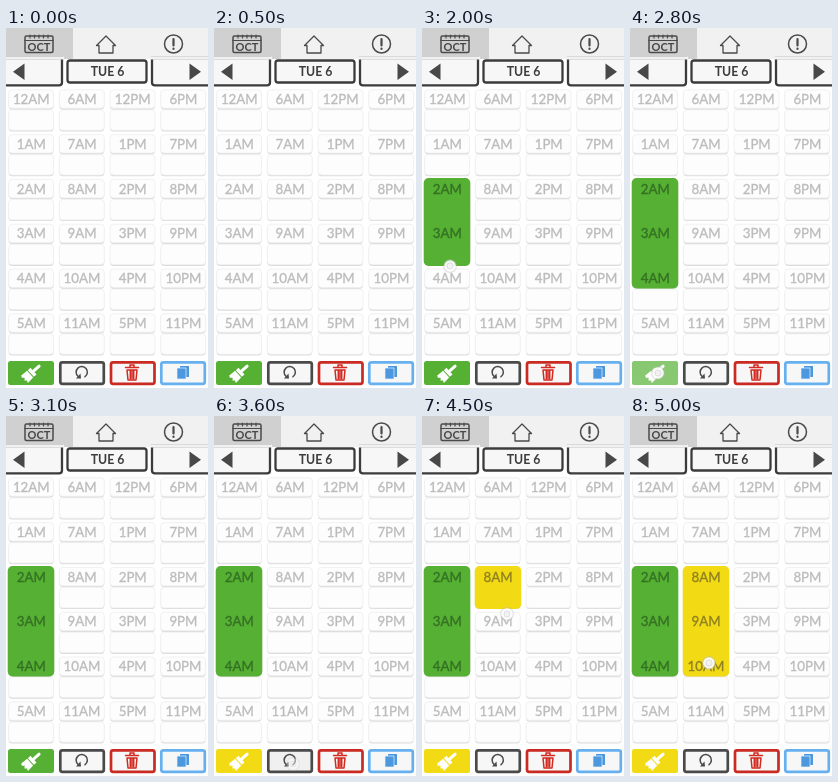
Animation, 202 px wide and 360 px high, one loop 5.1 s. Source, as an HTML page:

```html
<!DOCTYPE html>
<html lang="en">
<head>
<meta charset="utf-8">
<style>
html, body { margin: 0; width: 100%; height: 100%; overflow: hidden; background: #fff; }
svg { display: block; width: 100vw; height: 100vh; }
text { font-family: Lato, "Open Sans", sans-serif; text-anchor: middle; }
.line { fill: none; stroke: #4a4a4a; stroke-width: 1.5; stroke-linejoin: round; stroke-linecap: round; }
.bar { fill: #f7f7f7; stroke: #3c3c3c; stroke-width: 2.3; }
.button { fill: #f7f7f7; stroke-width: 2.7; }
.cell { fill: #fdfdfd; stroke: #eee; stroke-width: .8; }
.shade { fill: #dadada; }
.hour { font-size: 13.3px; stroke-width: .35; }
</style>
</head>
<body>
<svg viewBox="0 0 202 360" preserveAspectRatio="none">
  <rect width="202" height="360" fill="#fff"/>
  <rect width="202" height="31" fill="#f1f1f1"/>
  <rect width="67" height="31" fill="#d0d0d0"/>

  <g class="line">
    <rect x="19" y="8" width="28" height="16.500" rx="1.500"/>
    <path d="M19 12.500H47M24 7V10M28.500 7V10M33 7V10M37.500 7V10M42 7V10" stroke-width="1.200"/>
    <path d="M90.500 17.500L100 8L109.500 17.500H107V25H93V17.500Z" stroke-width="1.300"/>
    <circle cx="167.500" cy="16" r="9"/>
    <path d="M167.500 11V17.500M167.500 20.500V21" stroke-width="2.200"/>
  </g>
  <text x="33" y="23" font-size="11" font-weight="700" fill="#484848">OCT</text>

  <path class="bar" d="M-2 30H56V54.500Q56 57.300 53 57.300H-2Z"/>
  <path class="bar" d="M204 30H146V54.500Q146 57.300 149 57.300H204Z"/>
  <path d="M0 30H58M144 30H202" stroke="#f1f1f1" stroke-width="3"/>
  <rect class="bar" x="61.500" y="32.500" width="79" height="22" rx="2.500"/>
  <path d="M7 43.700L18.500 35.500V52ZM195 43.700L183.500 35.500V52Z" fill="#484848"/>
  <text x="101.500" y="48" font-size="12.300" font-weight="700" fill="#3c3c3c">TUE 6</text>

  <g id="cells"></g>
  <rect id="green" x="1.700" y="150" width="46.600" rx="5" fill="#55b033"/>
  <rect id="yellow" x="52.700" y="150" width="46.600" rx="5" fill="#f2da14"/>
  <g id="hours"></g>

  <rect id="brush" x="2" y="333" width="46" height="24" rx="2.500"/>
  <g transform="translate(26 344.500) rotate(48)" fill="#fff">
    <rect x="-1.500" y="-11" width="3" height="10" rx="1.400"/>
    <path d="M-4.500 -2H4.500V1.500H-4.500ZM-4.500 2.500H4.500L5 10L2.500 9L1 11L-1 9L-3 11L-5 10Z"/>
  </g>
  <rect id="press" x="2" y="333" width="46" height="24" rx="2.500" fill="#fff"/>

  <rect id="cycle" class="button" x="54.300" y="334.300" width="43.500" height="21.500" rx="2" stroke="#4a4a4a"/>
  <path class="line" d="M79 348.700A5.600 5.600 0 1 0 72 348.300" stroke-width="2"/>
  <path d="M70 350.500L75 350.500L74.500 345.500Z" fill="#4a4a4a"/>

  <rect class="button" x="105" y="334.300" width="43.500" height="21.500" rx="2" stroke="#c92a22"/>
  <path class="line" style="stroke:#d12a20" d="M119.500 339.500H132.500M124 338.500V337H128V338.500M121 342L122 352H130L131 342ZM124.300 343V350.500M126 343V350.500M127.700 343V350.500"/>

  <rect class="button" x="155.300" y="334.300" width="43.500" height="21.500" rx="2" stroke="#66b0f0"/>
  <path d="M174 338H183V349H174Z" fill="#4b98de"/>
  <path d="M171 340H180V351H171Z" fill="#4b98de" stroke="#e9f3fc" stroke-width=".7"/>

  <g id="touch">
    <circle r="7" fill="#bbb" opacity=".4"/>
    <circle r="5.800" fill="#fff" opacity=".9"/>
    <circle r="3" fill="#f2f2f2" stroke="#d4d4d4" stroke-width=".7"/>
  </g>
</svg>
<script>
const $ = id => document.getElementById(id);
const set = (node, attrs) => { for (const k in attrs) node.setAttribute(k, attrs[k]); };
function add(parent, tag, attrs) {
  const node = document.createElementNS("http://www.w3.org/2000/svg", tag);
  set(node, attrs);
  return parent.appendChild(node);
}

const labels = [];
function addBox(x, y, height) {
  const box = { x, width: 45, height, rx: 3.5 };
  add($("cells"), "rect", { ...box, class: "shade", y: y + 1.2 });
  add($("cells"), "rect", { ...box, class: "cell", y });
}
for (let h = 0; h < 24; h++) {
  const col = Math.floor(h / 6), row = h % 6;
  const x = 2.6 + col * 50.7, y = 61.8 + row * 44.8;
  addBox(x, y + 20, 20.5);
  addBox(x, y, 18.5);
  const node = add($("hours"), "text", { class: "hour", x: x + 22.7, y: y + 14.2 });
  node.textContent = (h % 12 || 12) + (h < 12 ? "AM" : "PM");
  labels.push({ node, col, y });
}

// Touch points: time, x, y, opacity
const drags = [
  [[1400, 33, 160, .7], [1600, 33, 173, 1], [2000, 28, 238, 1], [2200, 27, 250, 1], [2500, 27, 250, 0]],
  [[2600, 28, 345, .5], [2700, 28, 345, 1], [2800, 28, 345, 1], [3100, 28, 345, 0]],
  [[3300, 79, 348, .5], [3400, 79, 348, 1], [3800, 79, 348, 0]],
  [[4100, 86, 159, .7], [4200, 86, 169, 1], [4500, 85, 198, 1], [5000, 79, 247, 1]]
];

function touchAt(path, t) {
  const i = path.findIndex(p => p[0] >= t);
  if (i < 0 || t < path[0][0]) return null;
  if (!i) return path[0];
  const a = path[i - 1], b = path[i], k = (t - a[0]) / (b[0] - a[0]);
  return a.map((v, n) => v + (b[n] - v) * k);
}

const starts = [151, 171, 196, 216, 241], ends = [170, 193, 215, 238, 260.5];
function paintedTo(path, t) {
  if (t < path[0][0]) return 0;
  const y = (touchAt(path, t) || path[path.length - 1])[2];
  return ends[starts.filter(s => s + 4 <= y).length - 1];
}

function draw(t) {
  const bottoms = [paintedTo(drags[0], t), paintedTo(drags[3], t)];
  ["green", "yellow"].forEach((id, i) => set($(id), { height: Math.max(0, bottoms[i] - 150) }));
  for (const { node, col, y } of labels) {
    const painted = y > 150 && y < bottoms[col];
    const color = painted ? ["#347023", "#8f8021"][col] : "#bcbcbc";
    set(node, { fill: color, stroke: color });
  }
  const touches = drags.map(d => touchAt(d, t));
  const alpha = i => touches[i] ? touches[i][3] : 0;
  set($("brush"), { fill: t < 3500 ? "#55b033" : "#f2da14" });
  set($("press"), { opacity: alpha(1) * .3 });
  $("cycle").style.fill = alpha(2) > .2 ? "#f0f0f0" : "#f7f7f7";
  const p = touches.find(Boolean);
  set($("touch"), p ? { transform: `translate(${p[1]} ${p[2]})`, opacity: p[3] } : { opacity: 0 });
}

const began = performance.now();
function tick() {
  const t = (performance.now() - began) % 5100;
  draw(Math.floor(t / 100) * 100);
  requestAnimationFrame(tick);
}
tick();
</script>
</body>
</html>
```
